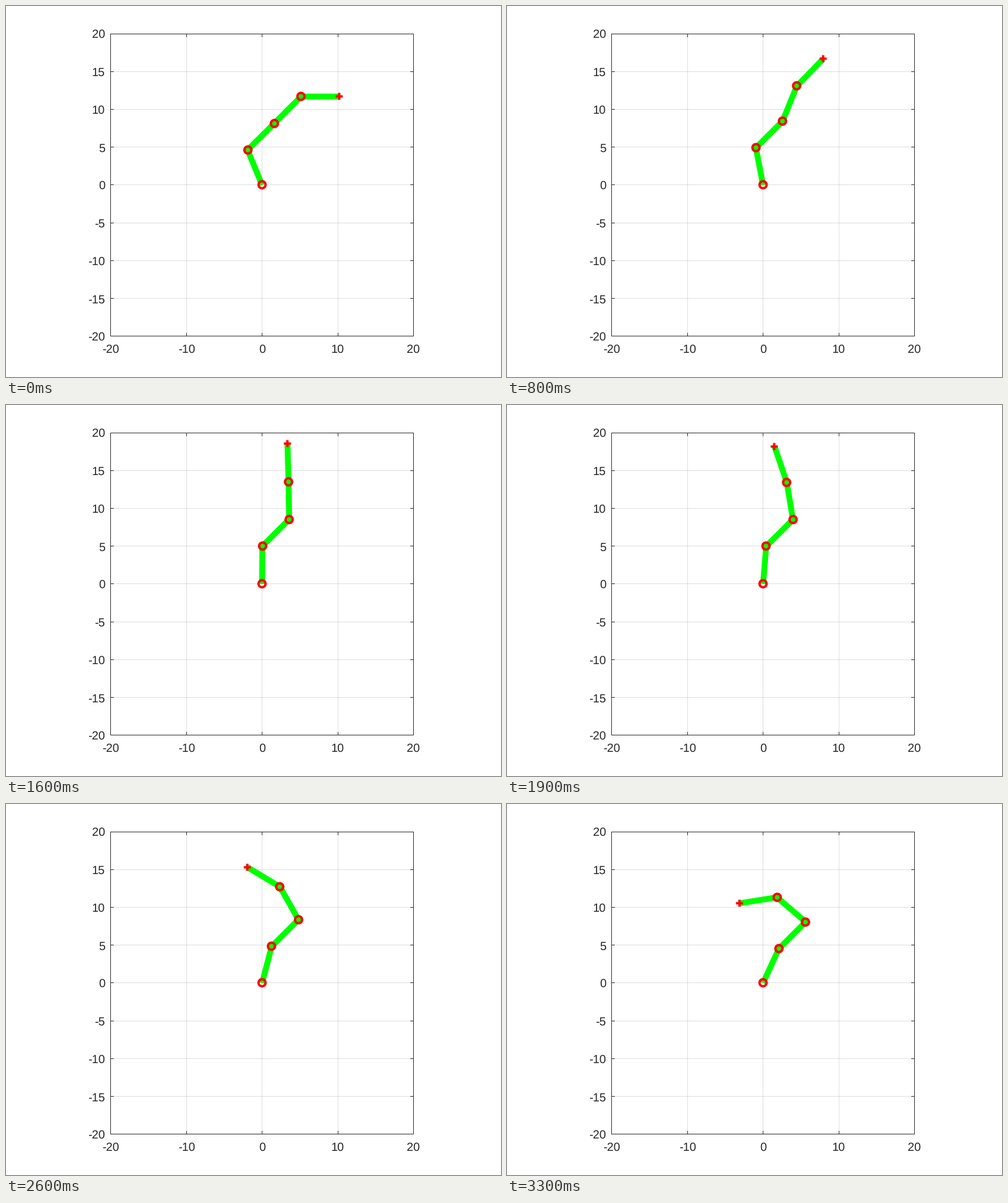
These frames come from a looping animation (840 by 630 pixels, 3.4 s). A matplotlib script:

```python
import numpy as np
import matplotlib.pyplot as plt
from matplotlib.animation import FuncAnimation

W, H, DPI = 840, 630, 120
PX = 72 / DPI                     # points per pixel
FRAMES, INTERVAL = 34, 100

# Plot box in pixels, y pointing down
CX, CY, SIDE = 434.59, 303.9, 513.7
SCALE = SIDE / 40
LINK = 5
INK = "#262626"

plt.rcParams["font.family"] = "Liberation Sans"
plt.rcParams["text.hinting"] = "none"

fig = plt.figure(figsize=(W / DPI, H / DPI), dpi=DPI, facecolor="white")
ax = fig.add_axes([0, 0, 1, 1])
ax.set_xlim(0, W)
ax.set_ylim(H, 0)
ax.axis("off")


def px(x):
    return CX + SCALE * x


def py(y):
    return CY - SCALE * y


def cell(v):
    """Centre of the pixel that holds v."""
    return np.floor(v) + 0.5


def line(xs, ys, color=INK, width=1, **kw):
    kw.setdefault("solid_capstyle", "butt")
    return ax.plot(xs, ys, color=color, lw=width * PX, snap=False, **kw)[0]


left, right = cell(px(-20)), cell(px(20))
top, bottom = cell(py(20)), cell(py(-20))


def draw_axes():
    label = dict(fontsize=20 * PX, color=INK, va="baseline")
    tick = 5.5
    for v in range(-20, 21, 10):
        x = cell(px(v))
        if abs(v) < 20:
            line([x, x], [top, bottom], alpha=0.15, zorder=1)
            line([x, x], [bottom, bottom - tick], zorder=2)
            line([x, x], [top, top + tick], zorder=2)
        ax.text(px(v), 590, str(v), ha="center", **label)
    for v in range(-20, 21, 5):
        y = cell(py(v))
        if abs(v) < 20:
            line([left, right], [y, y], alpha=0.15, zorder=1)
            line([left, left + tick], [y, y], zorder=2)
            line([right, right - tick], [y, y], zorder=2)
        ax.text(168, py(v) + 8, str(v), ha="right", **label)
    line([left, right, right, left, left], [top, top, bottom, bottom, top],
         zorder=2, solid_capstyle="projecting", solid_joinstyle="miter")


def joints(step):
    """Pixel positions of the arm's five points."""
    angles = [5 * np.pi / 8 - 0.025 * step,
              np.pi / 4,
              np.pi / 4 + 0.05 * step,
              0.1 * step]
    x = LINK * np.cumsum(np.r_[0, np.cos(angles)])
    y = LINK * np.cumsum(np.r_[0, np.sin(angles)])
    return px(x), py(y)


draw_axes()
arm = line([], [], "#00ff00", 10, zorder=3, solid_joinstyle="round")
rings = [plt.Circle((0, 0), 6, fill=False, ec="red", lw=4 * PX, zorder=4)
         for _ in range(4)]
for ring in rings:
    ax.add_patch(ring)
bars = [line([], [], "red", 4, zorder=4) for _ in range(2)]


def update(step):
    x, y = joints(step)
    arm.set_data(x, y)
    # Markers sit on whole pixels
    x, y = cell(x), cell(y)
    for ring, center in zip(rings, zip(x, y)):
        ring.center = center
    tx, ty = x[-1], y[-1]
    bars[0].set_data([tx - 6, tx + 6], [ty, ty])
    bars[1].set_data([tx, tx], [ty - 6, ty + 6])
    return [arm, *rings, *bars]


anim = FuncAnimation(fig, update, frames=FRAMES, interval=INTERVAL,
                     repeat=True, repeat_delay=0)
plt.show()
```
